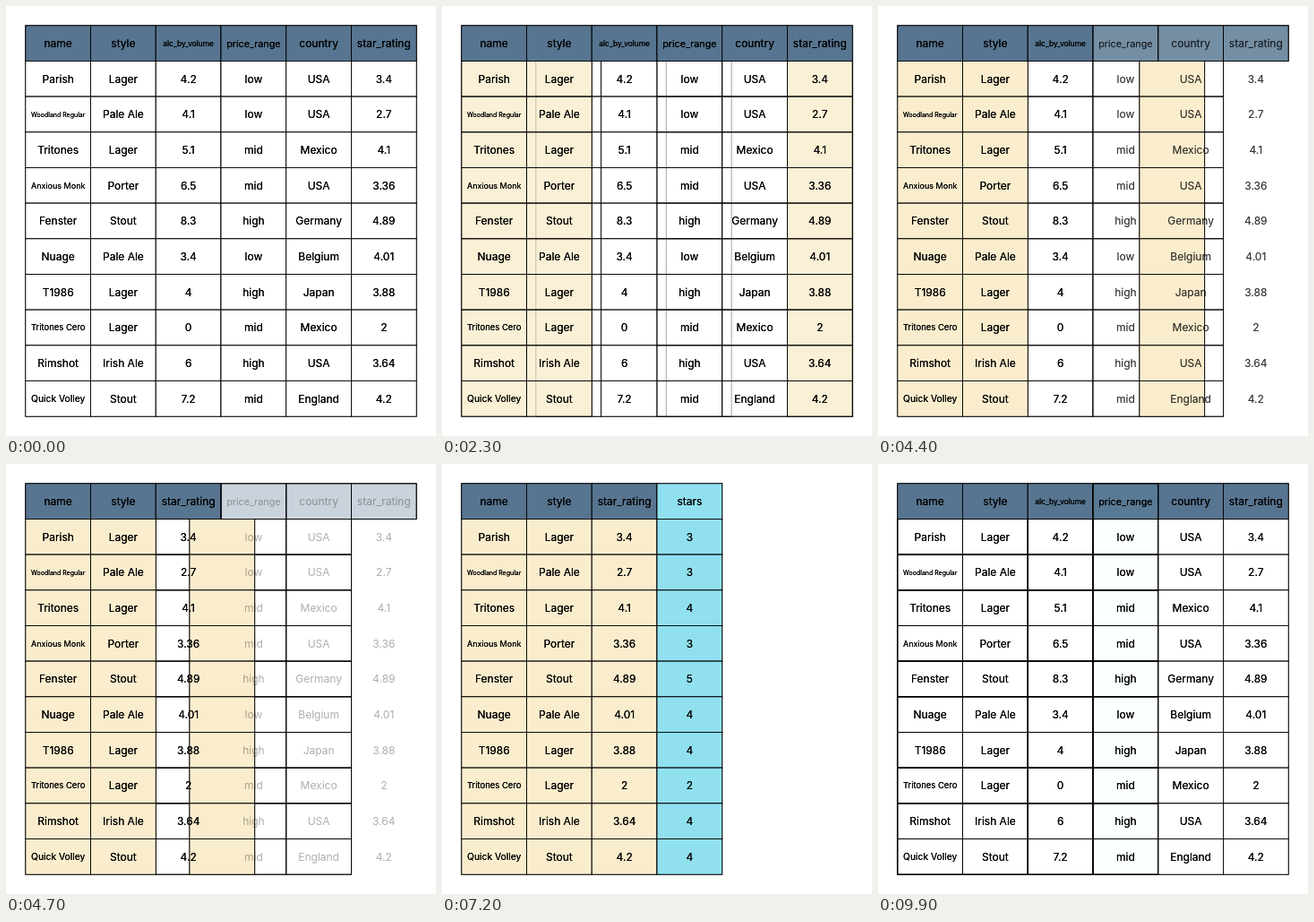
Animation, 480 px wide and 480 px high, one loop 10 s. Source, as an HTML page with a canvas:

```html
<!DOCTYPE html>
<html lang="en">
<head>
<meta charset="utf-8">
<title>Selecting and adding table columns</title>
<style>
  html, body { margin: 0; width: 100%; height: 100%; overflow: hidden; background: #fff; }
  canvas { display: block; width: 480px; height: 480px; }
</style>
</head>
<body>
<canvas id="stage"></canvas>
<script>
const SIZE = 480, LOOP = 10000, STEP = 100, STEPS = 11;
const MARGIN = SIZE / 22, COL = (SIZE / 1.1) / 6, ROW = (SIZE / 1.1) / 11;
const FILL = { head: '#577590', plain: '#ffffff', keep: '#faedcd', fresh: '#90e0ef' };

const table = `
name|style|alc_by_volume|price_range|country|star_rating
Parish|Lager|4.2|low|USA|3.4
Woodland Regular|Pale Ale|4.1|low|USA|2.7
Tritones|Lager|5.1|mid|Mexico|4.1
Anxious Monk|Porter|6.5|mid|USA|3.36
Fenster|Stout|8.3|high|Germany|4.89
Nuage|Pale Ale|3.4|low|Belgium|4.01
T1986|Lager|4|high|Japan|3.88
Tritones Cero|Lager|0|mid|Mexico|2
Rimshot|Irish Ale|6|high|USA|3.64
Quick Volley|Stout|7.2|mid|England|4.2`
  .trim().split('\n').map(line => line.split('|'));
table.forEach((row, i) => row.push(i ? String(Math.round(row[5])) : 'stars'));

// Columns occupied by each kind of cell, and the fields shown from left to right.
const all = [0, 1, 2, 3, 4, 5], three = [0, 1, 2];
const states = [
  { head: all, plain: all, keep: [], fresh: [], text: all },
  { head: all, plain: [2, 3, 4], keep: [0, 1, 5], fresh: [], text: all },
  { head: three, plain: [], keep: three, fresh: [], text: [0, 1, 5] },
  { head: three, plain: [], keep: three, fresh: [3], text: [0, 1, 5, 6] }
];
const starts = [1800, 4000, 6200, 9000];

const canvas = document.getElementById('stage');
const ctx = canvas.getContext('2d');
const ratio = window.devicePixelRatio || 1;
canvas.width = canvas.height = SIZE * ratio;
ctx.scale(ratio, ratio);
ctx.textAlign = 'center';
ctx.lineWidth = 0.9;

const mix = (a, b, t) => a + (b - a) * t;
const setFont = px => { ctx.font = `400 ${px}px Inter, sans-serif`; };

const sizes = { alc_by_volume: 8.4 };
function fontSize(label) {
  if (!sizes[label]) {
    setFont(12);
    sizes[label] = Math.min(12, 12 * 60.5 / ctx.measureText(label).width);
  }
  return sizes[label];
}

// Each cell and label is painted twice; only fills and letters fade.
function drawCell(col, row, fill, alpha) {
  const x = MARGIN + col * COL, y = MARGIN + row * ROW;
  ctx.fillStyle = fill;
  for (let i = 0; i < 2; i++) {
    ctx.globalAlpha = alpha;
    ctx.fillRect(x, y, COL, ROW);
    ctx.globalAlpha = 1;
    ctx.strokeRect(x, y, COL, ROW);
  }
}

function drawLabel(col, row, label, alpha) {
  const px = fontSize(label);
  const x = MARGIN + (col + 0.5) * COL, y = MARGIN + (row + 0.5) * ROW + px * 0.364;
  setFont(px);
  ctx.fillStyle = '#000';
  ctx.globalAlpha = alpha;
  for (let i = 0; i < 2; i++) ctx.fillText(label, x, y);
  ctx.globalAlpha = 1;
}

// Pairs two lists by index; unpaired items fade out or in.
function pair(from, to, e, visit) {
  for (let i = 0; i < Math.max(from.length, to.length); i++) {
    const a = from[i] ?? to[i], b = to[i] ?? from[i];
    const alpha = i >= to.length ? 1 - e : i >= from.length ? e : 1;
    if (alpha > 0) visit(a, b, alpha, i);
  }
}

function draw(from, to, p) {
  const e = p >= 1 ? 1 : (1 - Math.cos(Math.PI * p)) / 2;
  ctx.globalAlpha = 1;
  ctx.fillStyle = '#fff';
  ctx.fillRect(0, 0, SIZE, SIZE);
  for (const kind in FILL) {
    const first = kind === 'plain' || kind === 'keep' ? 1 : 0;
    const last = kind === 'head' ? 0 : table.length - 1;
    pair(from[kind], to[kind], e, (a, b, alpha) => {
      for (let r = first; r <= last; r++) drawCell(mix(a, b, e), r, FILL[kind], alpha);
    });
  }
  pair(from.text, to.text, e, (a, b, alpha, col) => {
    table.forEach((row, r) => drawLabel(col, r, row[e < 0.5 ? a : b], alpha));
  });
}

const begin = performance.now();
let shown = '';
function tick() {
  const t = (performance.now() - begin) % LOOP;
  const n = starts.filter(s => t >= s).length;
  const step = n ? Math.min(STEPS, Math.floor((t - starts[n - 1]) / STEP) + 1) : STEPS;
  const key = n + ':' + step;
  if (key !== shown) {
    draw(states[(n + 3) % 4], states[n % 4], step / STEPS);
    shown = key;
  }
  requestAnimationFrame(tick);
}
tick();
</script>
</body>
</html>
```
